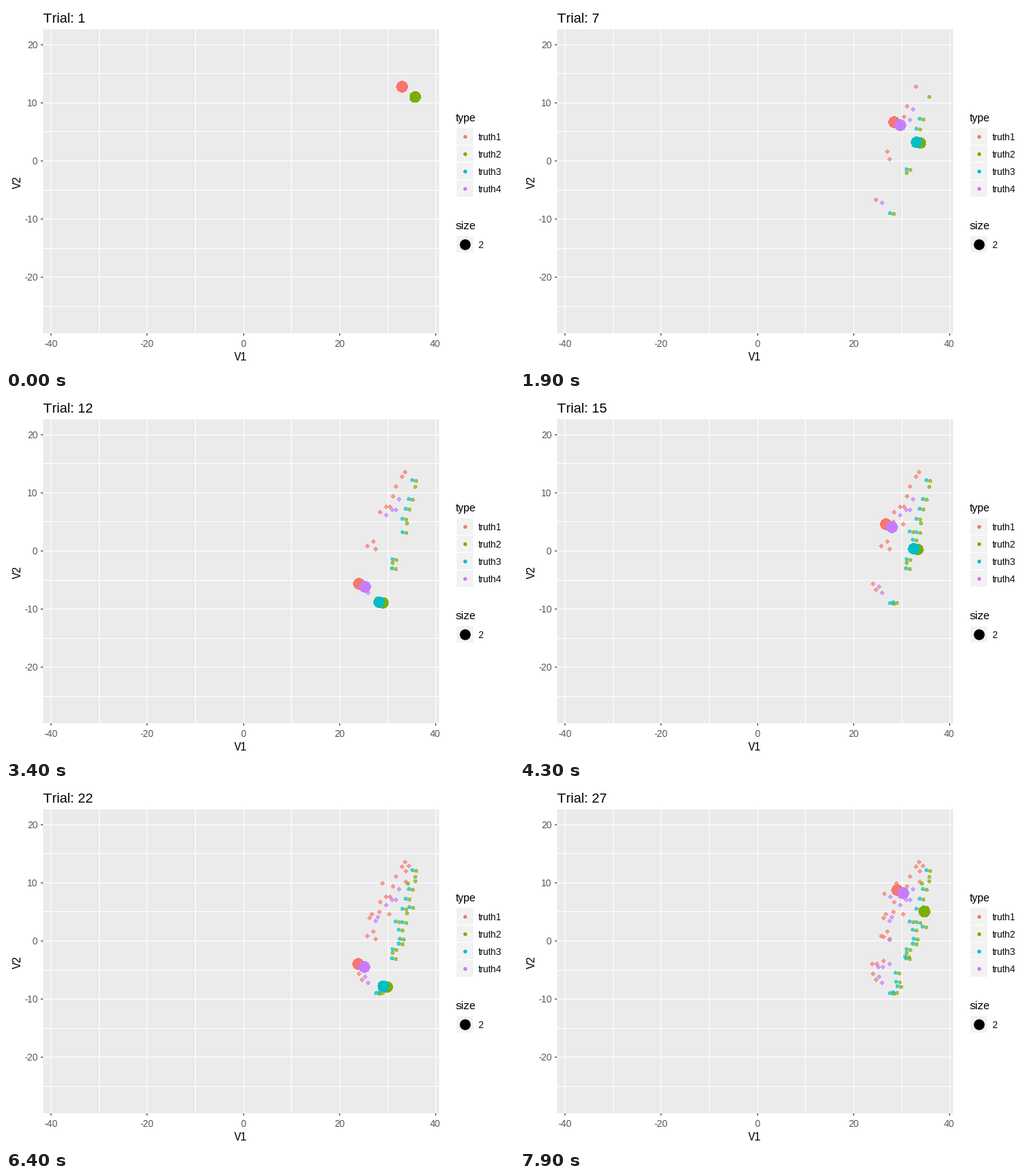
Write a matplotlib script that moves like this. It is 672x480 px and loops after 8 s.

```python
import matplotlib.pyplot as plt
from matplotlib.animation import FuncAnimation
from matplotlib.colors import to_rgba
from matplotlib.patches import Rectangle

W, H, DPI = 672, 480, 96
FRAMES, INTERVAL = 80, 100
PX = 72 / DPI  # points per pixel

plt.rcParams["font.family"] = "Liberation Sans"
plt.rcParams["text.hinting"] = "native"
plt.rcParams["text.hinting_factor"] = 1

COLORS = {"a": "#F8766D", "b": "#7CAE00", "c": "#00BFC4", "d": "#C77CFF"}
BIG, SMALL, KEY = 14.3, 4.2, 5
MARK_ALPHA = 0.7

# One key point per trial, with the types it shows
TRIALS = [
    (524, 107, "ab"), (512, 133, "abcd"), (489, 203, "ab"),
    (486, 193, "abc"), (508, 147, "abcd"), (471, 257, "abcd"),
    (495, 154, "abcd"), (528, 101, "abc"), (516, 120, "abc"),
    (503, 147, "abd"), (478, 199, "abc"), (467, 249, "abcd"),
    (507, 170, "abc"), (494, 167, "abc"), (484, 170, "abcd"),
    (529, 127, "ab"), (533, 106, "a"), (520, 109, "b"),
    (529, 113, "a"), (498, 129, "abc"), (481, 175, "abcd"),
    (466, 236, "abcd"), (481, 232, "abcd"), (472, 236, "abcd"),
    (482, 143, "abcd"), (481, 200, "abcd"), (499, 138, "abd"),
]


def points(x, y, types):
    """Spread the types around a key point: wider towards the left edge."""
    gap = 715 - 1.25 * x - 0.4 * y
    bx, by = x + gap, y + 0.8 * gap
    spots = {"a": (x, y), "b": (bx, by), "c": (bx - 5, by - 1), "d": (x + 8, y + 4)}
    return [(spots[t], COLORS[t]) for t in types]


fig = plt.figure(figsize=(W / DPI, H / DPI), dpi=DPI, facecolor="white")
ax = fig.add_axes([0, 0, 1, 1])
ax.set_xlim(0, W)
ax.set_ylim(H, 0)
ax.axis("off")


def box(x, y, w, h, color):
    ax.add_patch(Rectangle((x, y), w, h, fc=color, lw=0, antialiased=False))


def label(x, y, text, px, color="black", **kw):
    return ax.text(x, y, text, fontsize=px * PX, color=color, va="baseline", **kw)


def dots(diameter, x=(), y=(), color=None, zorder=2):
    return ax.scatter(x, y, s=(diameter * PX) ** 2, color=color, linewidths=0,
                      antialiased=False, zorder=zorder)


def draw_panel():
    box(49, 31, 524, 403, "#EBEBEB")
    for v in range(-40, 41, 10):
        x = round(313.6 + 6.365 * v)
        box(x, 31, 1, 403, "white")
        if v % 20 == 0:
            box(x, 434, 1, 3, "#333333")
            label(x, 452, str(v), 12, "#4D4D4D", ha="center")
    for v in range(-25, 21, 5):
        y = round(205 - 7.71 * v)
        box(49, y, 524, 1, "white")
        if v % 10 == 0:
            box(46, y, 3, 1, "#333333")
            label(42, y + 5, str(v), 12, "#4D4D4D", ha="right")
    label(310.5, 470, "V1", 15, ha="center")
    label(20, 233, "V2", 15, ha="center", rotation=90, rotation_mode="anchor")


def draw_legend():
    label(595, 153, "type", 15)
    for i, color in enumerate(COLORS.values()):
        y = 161 + 23 * i
        box(596, y + 1, 22, 22, "#F2F2F2")
        dots(KEY, [606.5], [y + 11.5], color)
        label(625, y + 17, f"truth{i + 1}", 12)
    label(595, 296, "size", 15)
    box(596, 305, 22, 22, "#F2F2F2")
    dots(BIG, [606.5], [316], "black")
    label(624, 321, "2", 12)


draw_panel()
draw_legend()
title = label(49.3, 22, "", 17.6)
marks = dots(SMALL, zorder=3)
current = dots(BIG, zorder=4)


def place(artist, trials, alpha):
    picked = [p for trial in trials for p in points(*trial)]
    artist.set_visible(bool(picked))
    if picked:
        artist.set_offsets([pos for pos, _ in picked])
        artist.set_facecolor([to_rgba(c, alpha) for _, c in picked])


def trial_at(i):
    return 1 if i < 2 else max(2, i // 3 + 1)


def title_at(i):
    # the counter trails the points by one step
    return trial_at(max(0, i - 1))


def update(i):
    now = trial_at(i)
    place(marks, TRIALS[:now - 1], MARK_ALPHA)
    place(current, TRIALS[now - 1:now], 1)
    title.set_text(f"Trial: {title_at(i)}")
    return marks, current, title


anim = FuncAnimation(fig, update, frames=FRAMES, interval=INTERVAL,
                     init_func=lambda: update(0), repeat=True)
plt.show()
```
